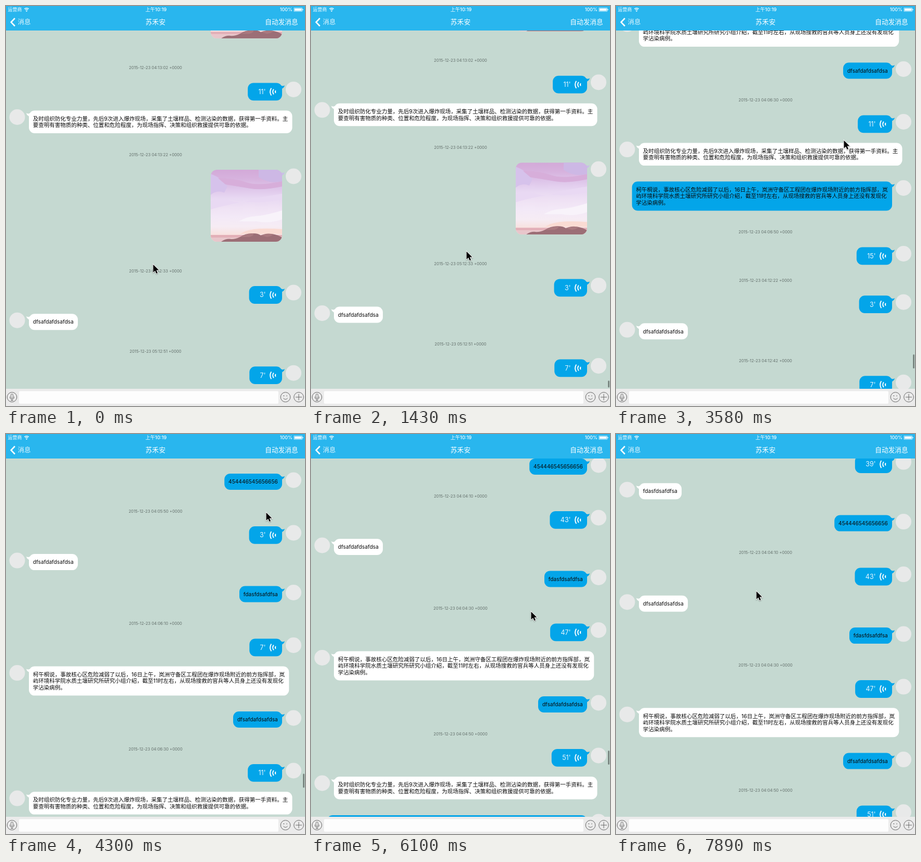
An HTML page with a canvas for the animation above (8 s loop, 574x767 px).

```html
<!DOCTYPE html>
<html lang="zh-CN">
<head>
<meta charset="utf-8">
<style>
html, body { margin: 0; width: 100%; height: 100%; overflow: hidden; background: #c5d9d1 }
canvas { display: block }
</style>
</head>
<body>
<canvas width="574" height="767"></canvas>
<script>
const c = document.querySelector('canvas').getContext('2d');
const FONT = 'Inter, "Noto Sans CJK SC", "Noto Sans CJK", sans-serif';
const BLUE = '#03a5e9', LOOP = 8000, STEP = 358.6;
const TOP = 47, BOTTOM = 734, LINE = 12.5, REST = -2539;

const TEXTS = {
  a: ['dfsafdafdsafdsa'],
  b: ['fdasfdsafdfsa'],
  c: ['454446545656656'],
  d: ['及时组织防化专业力量，先后9次进入爆炸现场，采集了土壤样品、检测沾染的数据，获得第一手资料。主',
      '要查明有害物质的种类、位置和危险程度，为现场指挥、决策和组织救援提供可靠的依据。'],
  e: ['柯午桐说，事故核心区危险减弱了以后，16日上午，岚洲守备区工程团在爆炸现场附近的前方指挥部，岚',
      '屿环境科学院水质土壤研究所研究小组介绍，截至11时左右，从现场搜救的官兵等人员身上还没有发现化',
      '学沾染病例。']
};

// v: voice with seconds, l / r: text on the left / right, t: time, p: picture
const CHAT = `v39 lb rc t04:04:10 v43 la rb t04:04:30 v47 le ra t04:04:50 v51 ld re
  t04:05:10 v55 lc rd t04:05:30 v59 lb rc t04:05:50 v3 la rb t04:06:10 v7 le ra
  t04:06:30 v11 ld re t04:06:50 v15 t04:12:22 v3 la t04:12:42 v7 le p
  t04:13:02 v11 ld t04:13:22 p t05:12:33 v3 la t05:12:51 v7`.split(/\s+/);

const SCROLL = [REST, -2543, -2566, -2577, -2552.7, -2440, -2289, -2087, -1911, -1760, -1614.5, -1420,
  -1191, -836, -584, -347.3, -190, -67.6, -20, 41.1, 41.1, 41.1, 41.1];
const POINTER = [[283, 495], [285, 492], [291, 483], [295, 478], [299, 470], [301, 500], [303, 525], [304, 546],
  [345, 450], [390, 350], [438, 257], [562, 42], [500, 150], [440, 230], [400, 280], [373, 314],
  [398, 330], [423, 340], [460, 420], [506, 481], [508, 490], [278, 364], [270, 301]];

function text(s, x, y, size, color, align = 'left', weight = 400) {
  c.font = `${weight} ${size}px ${FONT}`;
  c.textAlign = align;
  c.fillStyle = color;
  c.fillText(s, x, y + size * .37);
}

function box(x, y, w, h, r, color) {
  c.fillStyle = color;
  c.beginPath();
  c.roundRect(x, y, w, h, r);
  c.fill();
}

function disc(x, y, r, color) {
  c.fillStyle = color;
  c.beginPath();
  c.arc(x, y, r, 0, 7);
  c.fill();
}

function arc(x, y, r, from, to) {
  c.beginPath();
  c.arc(x, y, r, from, to);
  c.stroke();
}

function shape(d, x, y, color) {
  c.save();
  c.translate(x, y);
  c.fillStyle = color;
  c.fill(new Path2D(d));
  c.restore();
}

function line(d, color, width) {
  c.strokeStyle = color;
  c.lineWidth = width;
  c.stroke(new Path2D(d));
}

function avatarAndTail(right, y, color) {
  disc(right ? 552 : 21.5, y + 12.5, 15, '#e8e9e9');
  if (right) shape('M-2 5Q2 7 5 4.8Q4 9 0 11H-2Z', 530, y, color);
  else shape('M2 5Q-2 7 -5 4.8Q-4 9 0 11H2Z', 44, y, color);
}

function bubble(right, y, w, h, color) {
  avatarAndTail(right, y, color);
  const x = right ? 530 - w : 44;
  box(x, y, w, h, 11, color);
  return x;
}

function message(right, lines, y) {
  const size = lines.length > 1 ? 10.5 : 10.2;
  c.font = `400 ${size}px ${FONT}`;
  const w = Math.max(...lines.map(s => c.measureText(s).width)) + 16;
  const x = bubble(right, y, w, 18.5 + LINE * lines.length, right ? BLUE : '#fff');
  lines.forEach((s, i) => text(s, x + 7.8, y + 15.5 + i * LINE, size, '#0a0a0a'));
}

function voice(seconds, y) {
  c.font = `400 12.6px ${FONT}`;
  bubble(true, y, c.measureText(seconds + "'").width + 51.8, 33.8, BLUE);
  text(seconds + "'", 498.5, y + 16.7, 12.6, '#e6f6ff', 'right');
  c.strokeStyle = '#fff';
  c.lineWidth = 1.9;
  arc(520.5, y + 17, 13.2, 2.58, 3.7);
  arc(520.5, y + 17, 8.2, 2.5, 3.78);
  arc(520.5, y + 17, 3.5, 2.4, 3.88);
}

function picture(y) {
  avatarAndTail(true, y, '#c9bfe6');
  c.save();
  c.beginPath();
  c.roundRect(393, y, 137, 138, 12);
  c.clip();
  c.translate(393, y);
  const sky = c.createLinearGradient(0, 0, 0, 138);
  ['#d3a9d8', '#d7b3de', '#dec6ea', '#e8d8f2', '#efe2f4', '#f3e9f7', '#f6ecf4', '#f8e0dc']
    .forEach((color, i) => sky.addColorStop(i / 7.6, color));
  c.fillStyle = sky;
  c.fillRect(0, 0, 137, 138);
  shape('M0 8Q22 16 32 32L26 44Q12 38 0 48Z', 0, 0, '#d6c2eb');
  shape('M14 16Q45 16 68 24T137 22V32Q100 40 76 36T28 28Z', 0, 0, '#d7aeda');
  shape('M92 0H137V22Q112 28 92 14Z', 0, 0, '#cdb8e5');
  shape('M0 60Q18 52 40 60T82 55L137 46V56Q104 64 80 62T0 76Z', 0, 0, '#e9d9f3');
  shape('M54 99Q68 90 86 89T137 78V95Q112 104 88 99Z', 0, 0, '#f8f3fa');
  shape('M66 118Q88 110 137 114V123H56Z', 0, 0, '#fadbd3');
  shape('M0 125H137V130H0Z', 0, 0, '#e3b0b8');
  shape('M0 130H137V138H0Z', 0, 0, '#e8c6cb');
  shape('M20 138Q30 131 40 133Q48 133 56 129Q68 121 82 122Q92 122 96 126Q106 121 118 123Q130 125 137 130V138Z',
    0, 0, '#9c6e76');
  shape('M58 129Q70 122 82 122Q84 126 74 129ZM97 126Q108 121 120 124Q116 128 108 129Z', 0, 0, '#aa7a80');
  c.restore();
}

function drawChat(offset) {
  let y = offset;
  for (const item of CHAT) {
    const kind = item[0], value = item.slice(1);
    const shown = y > -190 && y < 780;
    if (kind == 't') {
      if (shown) text(`2015-12-23 ${value} +0000`, 287, y + 10.5, 7.7, '#626e6a', 'center');
      y += 39.6;
    } else if (kind == 'v') {
      if (shown) voice(value, y);
      y += 53.1;
    } else if (kind == 'p') {
      if (shown) picture(y);
      y += 183.5;
    } else {
      const lines = TEXTS[value];
      if (shown) message(kind == 'r', lines, y);
      y += 48.9 + LINE * lines.length;
    }
  }
}

function drawThumb(offset) {
  const over = Math.max(0, REST - offset);
  const h = Math.max(7, 27 - over);
  const bottom = over ? 731.5 : 631.3 - offset * .0395;
  box(570, bottom - h, 3, h, 1.5, 'rgba(0,0,0,.38)');
}

function drawHeader() {
  c.fillStyle = '#29b6ee';
  c.fillRect(0, 0, 574, TOP);
  text('运营商', 3.5, 7, 9, '#fff', 'left', 500);
  c.strokeStyle = '#fff';
  c.lineWidth = 1.3;
  for (const r of [3.6, 6.2]) arc(39.5, 10, r, 3.95, 5.48);
  disc(39.5, 9.6, 1.2, '#fff');
  text('上午10:19', 288, 7, 9.2, '#fff', 'center', 500);
  text('100%', 550, 7, 9, '#fff', 'right', 500);
  c.lineWidth = .7;
  c.strokeRect(553, 3.8, 15.5, 6.4);
  box(554, 4.8, 13.5, 4.4, .5, '#fff');
  box(569.3, 5.8, 1.2, 2.4, .5, '#fff');
  line('M17 23.5L9.8 31 17 38.5', '#fff', 2.6);
  text('消息', 22.5, 30.7, 12.5, '#e3f5fd');
  text('苏禾安', 287, 30.5, 12.8, '#fff', 'center', 500);
  text('自动发消息', 560.7, 30.7, 12.7, '#fff', 'right', 500);
}

function drawInput() {
  c.fillStyle = '#ebebeb';
  c.fillRect(0, BOTTOM, 574, 33);
  box(25, 738.5, 498, 24, 2, '#fdfdfd');
  c.strokeStyle = '#666';
  c.lineWidth = 1;
  for (const x of [11.5, 536.5, 562]) arc(x, 750, 9.3, 0, 7);
  line('M9.5 746a2 2 0 0 1 4 0v4a2 2 0 0 1-4 0zM7.5 749v1a4 4 0 0 0 8 0v-1M11.5 754v2.5M9 756.5h5', '#666', .9);
  line('M532 747.5h2.5M539 746.5v2M532.5 752q4 4.5 8 0M556 750h12M562 744v12', '#666', 1);
}

function drawPointer([x, y]) {
  c.save();
  c.translate(x - 1.2, y - .8);
  const arrow = new Path2D('M.8 1.5V16.5L4.4 13.2 6.8 18.8 9.3 17.7 6.9 12.3H11.7Z');
  c.shadowColor = 'rgba(0,0,0,.35)';
  c.shadowBlur = 2;
  c.shadowOffsetY = 1;
  c.strokeStyle = '#fff';
  c.lineWidth = 1.8;
  c.stroke(arrow);
  c.shadowColor = 'transparent';
  c.fillStyle = '#000';
  c.fill(arrow);
  c.restore();
}

function draw() {
  const t = performance.now() % LOOP;
  const step = Math.min(SCROLL.length - 1, Math.floor((t + 10) / STEP));
  const offset = SCROLL[step];
  c.fillStyle = '#c5d9d1';
  c.fillRect(0, 0, 574, 767);
  drawChat(offset);
  if (step > 0 && step < 20) drawThumb(offset);
  drawHeader();
  drawInput();
  drawPointer(POINTER[step]);
  requestAnimationFrame(draw);
}
draw();
</script>
</body>
</html>
```
